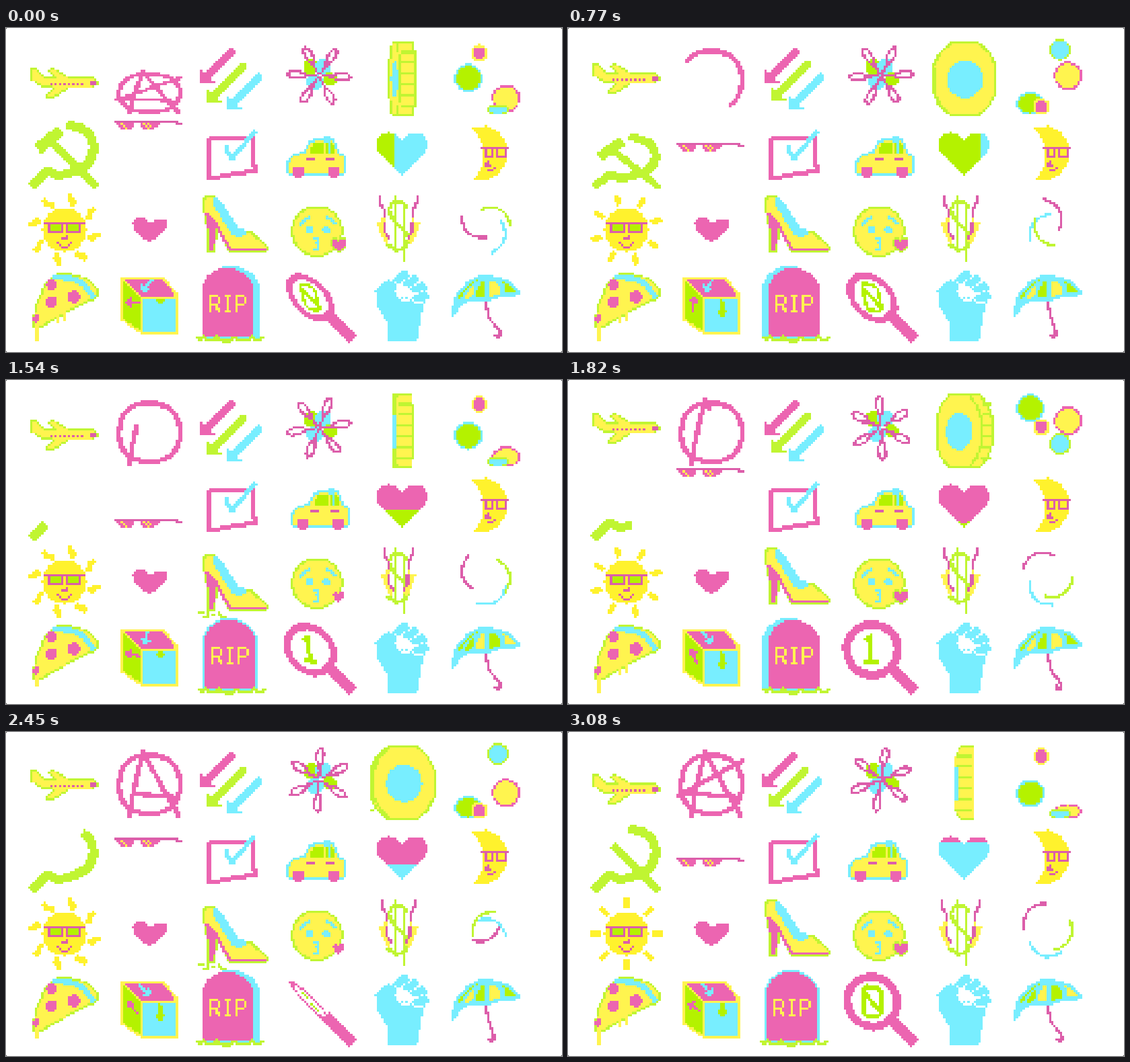
Recreate the animation shown at these times as an HTML page with a canvas. Size 826 by 482 pixels, loop 3.15 s.

```html
<!DOCTYPE html>
<html lang="en">
<head>
<meta charset="utf-8">
<title>Pixel stickers</title>
<style>
  html, body { margin: 0; width: 100%; height: 100%; overflow: hidden; background: #000; }
  canvas { display: block; width: 826px; height: 482px; border-radius: 2px; image-rendering: pixelated; }
</style>
</head>
<body>
<canvas id="stage" width="252" height="147"></canvas>
<script>
const W = 252, H = 147, CELL = 826 / W, BOX = 38, STEP = 70, FRAMES = 45;
const PINK = '#ec65b1', PLUM = '#dc5eaa', CYAN = '#78eeff', LIME = '#c0f532',
      LEAF = '#b4f200', YELLOW = '#fff44f', SUN = '#fff22d', WHITE = '#ffffff';
const { PI, abs, cos, sin, max, min, floor, round } = Math;

const out = document.getElementById('stage').getContext('2d');
const image = out.createImageData(W, H);
const pixels = new Uint32Array(image.data.buffer);
const scratch = document.createElement('canvas');
scratch.width = W; scratch.height = H;
const g = scratch.getContext('2d', { willReadFrequently: true });
g.lineJoin = 'round';
let boxX = 0, boxY = 0;

// Draws one shape and snaps it to whole cells.
function draw(color, render, clip) {
  g.save();
  g.resetTransform();
  g.clearRect(boxX, boxY, BOX, BOX);
  g.restore();
  g.save();
  if (clip) g.clip(new Path2D(clip));
  render();
  g.restore();
  const { data } = g.getImageData(boxX, boxY, BOX, BOX);
  const n = parseInt(color.slice(1), 16);
  const abgr = (0xff000000 | (n & 255) << 16 | n & 0xff00 | n >> 16) >>> 0;
  for (let i = 0; i < BOX * BOX; i++) {
    if (data[i * 4 + 3] > 118) pixels[(boxY + floor(i / BOX)) * W + boxX + i % BOX] = abgr;
  }
}
const fill = (color, d, clip) => draw(color, () => g.fill(new Path2D(d)), clip);
const line = (color, width, d, length, clip) => draw(color, () => {
  g.lineWidth = width;
  g.setLineDash(length === undefined ? [] : [max(length, 0), 9999]);
  g.stroke(new Path2D(d));
}, clip);
function outlined(color, ink, d, width = 6.5) {
  line(ink, width, d);
  fill(color, d);
}
const oval = (x, y, rx, ry = rx) =>
  `M${x - rx} ${y}a${rx} ${ry} 0 1 0 ${2 * rx} 0a${rx} ${ry} 0 1 0 ${-2 * rx} 0z`;
const rect = (x, y, w, h) => `M${x} ${y}h${w}v${h}h${-w}z`;
const snap = v => round(v / CELL) * CELL;
function moved(x, y, paint, sx = 1, sy = sx, turn = 0) {
  g.save();
  g.translate(x, y);
  g.rotate(turn);
  g.scale(sx, sy);
  paint();
  g.restore();
}
const shift = (x, y, paint) => moved(snap(x), snap(y), paint);
const squashed = (ground, scale, paint) => moved(0, ground * (1 - scale), paint, 1, scale);
// One-cell pen; the path counts cells from x, y.
const pen = (color, x, y, d) => moved(snap(x) + CELL / 2, snap(y) + CELL / 2, () => {
  g.lineCap = 'square';
  line(color, 1, d);
}, CELL);
const rad = a => a * PI / 180;
const wave = (f, period, peak = 0) => cos(2 * PI * (f - peak) / period);
const tap = f => f % 15 > 4 && f % 15 < 9;

function plane(f) {
  shift(0, -6.5 - 11 * wave(f, 22.5, 6.7), () => {
    outlined(YELLOW, LIME, 'M39 66L46 66L56 78L78 77L64 67L70 65L92 78H128L135 85L128 90H94L68 106L61 105L76 91L54 88L40 80Z', 5);
    for (let i = 0; i < 8; i++) pen(PLUM, 67 + 2 * CELL * i, 84, 'M0 0v.01');
    fill(PLUM, rect(126, 81, 9, 7));
  });
}

function anarchy(f) {
  const ring = 'M175 52Q188 33 213 34Q258 36 259 78Q256 122 213 122Q168 120 168 78Q168 62 176 50';
  const legs = 'M182 128L188 95L203 30L238 92L258 126', bar = 'M258 98L176 90L164 94L262 42';
  const write = t => {
    line(PINK, 7, ring, 23 * (t - 4));
    line(PINK, 7, legs, 14 * (t - 17.5));
    line(PINK, 7, bar, 35 * (t - 33));
  };
  if (f < 7) squashed(131, max(0.04, 0.65 - 0.105 * f), () => write(FRAMES));
  write(f);
}

function arrows(f) {
  const s = 1.8 * wave(f, 22.5, 6.6);
  [[PINK, 290, 82, 54], [LIME, 300, 110, 61], [CYAN, 327, 121, 55]].forEach(([c, x, y, n]) =>
    shift(x + s, y - s, () => fill(c, `M0 0V-23L7 -15L${n - 7} ${-n}L${n} ${7 - n}L15 -7L23 0Z`)));
}

function atom(f) {
  fill(LEAF, oval(453, 58, 11));
  fill(CYAN, oval(471, 57, 11));
  fill(LEAF, oval(481, 76, 10));
  fill(CYAN, oval(459, 80, 12));
  for (let i = 0; i < 6; i++) {
    moved(465, 71, () => line(PLUM, 3.4, 'M2 0H16L30 -5H42L48 0L42 5H30L16 0'), 1, 1, rad(i * 60 + 3 - 6 * f));
  }
}

const disc = (x, rx, ry) => `M${x - 0.42 * rx} ${76 - ry}h${0.84 * rx}` +
  [[0.38, 0.28], [0.2, 0.35], [0, 0.74], [-0.2, 0.35], [-0.38, 0.28], [-0.84, 0],
   [-0.38, -0.28], [-0.2, -0.35], [0, -0.74], [0.2, -0.35]].map(([x, y]) => `l${x * rx} ${y * ry}`).join('') + 'z';

function coin(f) {
  const spin = rad((98 + 8 * f + 90) % 180 - 90), a = spin - 0.2 * sin(2 * spin);
  const rx = 47 * cos(a), reach = 12 * sin(a), face = 589 + reach, rim = 589 - reach;
  const slab = (c, inset) => {
    for (let t = -1; t <= 1; t += 0.25) fill(c, disc(589 + t * reach, max(rx - inset, 2), 56 - inset));
  };
  slab(LIME, 0);
  slab(YELLOW, 3.3);
  for (let y = 36; y < 120; y += 16) {
    const w = -Math.sign(a) * rx * 0.97;
    line(LIME, 3.6, `M${face + w} ${y}L${rim + w} ${y}`);
  }
  fill(LIME, disc(face, rx, 56));
  fill(YELLOW, disc(face, max(rx - 3.3, 1), 52.7));
  fill(CYAN, oval(face, 76, max(27 * cos(a), 4), 28));
}

function balls(f) {
  const ball = (x, r, inner, outer, peak, air, top, ground) => {
    const late = (f - peak + 33.75) % 22.5 - 11.25;
    const y = ground - (ground - top) * max(0, 1 - (late / air) ** 2);
    const ry = min(r, 129 - y);
    fill(outer, oval(x, y, r, ry));
    fill(inner, oval(x, y, r - 3, ry - 3));
  };
  ball(687, 21, LEAF, CYAN, 4.5, 6.5, 40, 112);
  ball(743, 21, YELLOW, PINK, 6.7, 7.4, 47, 118);
  ball(731, 16, CYAN, LIME, 11.5, 9.5, 32, 121);
  ball(703, 12, PINK, YELLOW, 21.8, 6.5, 36, 117);
}

function sickle(f) {
  const blade = 'M38 236L62 212L78 220L95 215Q133 205 130 175Q127 147 90 144';
  const handle = 'M136 237L66 168';
  if (f < 23) {
    squashed(242, min(1, max(0.03, (22.5 - f) / 14)), () => {
      line(LIME, 13, blade);
      line(LIME, 11, handle);
      line(LIME, 17, 'M47 180L82 152');
    });
  }
  line(LIME, 13, blade, 10 * (f - 19));
  line(LIME, 11, handle, 20 * (f - 38.5));
}

function shades(f) {
  shift(0, 130 + 3.15 * ((f + 2) % 28), () => {
    fill(PLUM, 'M160 0H254V3.3H262V6.6H252V3.3H160Z');
    fill(PINK, 'M164 3H192L186 13H174L166 8ZM198 3H231L219 13H207L200 9Z');
    pen(YELLOW, 169, 4, 'M0 0L2 2M10 0L12 2M12 0L13 1');
  });
}

function checkbox(f) {
  line(PINK, 6.5, 'M303 163H366V188L370 213L340 216L326 220L303 224Z');
  const p = f % 15;
  line(CYAN, 7, 'M328 174V182L336 194L371 152', p < 1 ? 99 : 25 * (p - 2));
}

function car(f) {
  shift(13 * Math.exp(-(((f % 15 - 9.6) / 3) ** 2)), 0, () => {
    outlined(YELLOW, CYAN, 'M421 199L428 190L444 187L452 171L460 168H486L493 188L503 192V213L498 216H421Z');
    fill(CYAN, rect(472, 160, 10, 9));
    fill(LEAF, 'M450 186L457 171H472V186ZM476 171H486L490 186H476Z');
    pen(CYAN, 478, 167, 'M0 0V5');
    pen(PLUM, 446, 193, 'M0 0H3M9 0H12');
    fill(PINK, oval(434, 214, 9) + oval(487, 214, 9));
  });
}

// Three wipes in turn: from the left, from the top, from below.
function heart(f) {
  const d = 'M588 219L554 186Q547 173 553 163Q559 155 569 156Q581 156 588 167Q595 156 607 156Q618 156 623 163Q628 173 622 186Z';
  const p = f % 15, pass = floor(f / 15), tones = [CYAN, LEAF, PINK, CYAN];
  const wipe = [rect(540, 150, 37 + 3.3 * p, 80), rect(540, 150, 100, 12 + 4.5 * p), rect(540, 216 - 3.7 * p, 100, 80)];
  fill(tones[pass], d);
  fill(tones[pass + 1], d, wipe[pass]);
}

function moon() {
  fill(SUN, 'M691 147L716 146Q745 157 745 187Q743 216 716 226L691 227Q712 211 709 187Q708 162 691 147Z');
  pen(PLUM, 704, 176, 'M0 0H12M2 1V4H5V1M7 1V4H11V1M3 6L2 8H4M3 10H5L6 9');
}

function sun(f) {
  const p = f % 15, ray = p < 9 ? 'M37 2L43 4L47 -2L55 -2' : 'M38 0H54';
  const turn = 12 + 5.5 * max(0, p - 8);
  for (let i = 0; i < 8; i++) moved(87, 300, () => line(SUN, 8, ray), 1, 1, rad(turn + i * 45));
  fill(SUN, oval(87, 300, 33));
  fill(LEAF, rect(65, 290, 18, 10) + rect(92, 290, 17, 10));
  pen(PLUM, 55, 287, 'M0 0H18M2 1V4H8V1M10 1V4H16V1M10 6V7H8M6 9L8 11H10L12 9');
}

function smallHeart(f) {
  if (f % 24 > 4 && f % 24 < 9) return;
  fill(PINK, 'M213 320L190 300L188 290L194 282H205L213 291L222 285H238V298Z');
}

function heel(f) {
  const down = tap(f);
  shift(0, down ? 10 : 0, () => {
    const shoe = 'M296 254L309 251L340 302L362 304L386 326V331H333L318 300L296 274Z';
    const shaft = 'M299 280L311 292L309 331H302Z';
    line(LIME, 6, shoe + shaft);
    fill(YELLOW, shoe);
    fill(PINK, shaft);
    fill(CYAN, 'M309 250L318 256L345 297L360 303L350 311L337 309L308 264Z');
    line(PINK, 4, 'M297 276L312 291L325 316L334 330H386');
  });
  if (down) pen(LIME, 285, 345, 'M0 0H2M2 2H3M4 0V2M6 1H7M9 0L10 2M11 2H12');
}

function kiss(f) {
  outlined(YELLOW, LIME, oval(462, 302, 35));
  line(CYAN, 3.8, 'M437 293L447 283L454 281M474 281L482 284L490 293');
  fill(CYAN, oval(451, 300, 6, 5) + oval(476, 300, 6, 5));
  pen(CYAN, 457, 312, 'M0 0H2V2H1M2 3V5H0');
  moved(494, 321, () => {
    const d = 'M0 12L-9 2V-7H-3L0 -3L3 -7H10V2Z';
    if (!tap(f)) line(LIME, 4, d);
    fill(PINK, d);
  }, tap(f) ? 0.8 : 1);
}

function dollar(f) {
  line(LIME, 5, 'M597 268L587 257L575 259L568 270L575 285L591 299L599 313L591 328L579 331L566 321');
  line(LIME, 4.5, 'M579 249V330M592 260V346');
  const sway = 2 - 3 * wave(f, 15);
  [1, -1].forEach(side => shift(side * sway, 0, () => {
    const flame = 'M-21 -18L-25 6L-15 18M-30 -10L-24 8L-17 22', edge = 'M-27 -48V-37L-21 -27V-15M-20 -10V6L-13 16';
    moved(583, 298, () => {
      line(YELLOW, 5, flame);
      line(PLUM, 3.6, edge);
    }, side, 1);
  }));
}

function arcs(f) {
  [[PLUM, 705, 284, 130], [CYAN, 714, 306, 15], [LIME, 721, 295, -60]].forEach(([c, x, y, a]) =>
    moved(x, y, () => line(c, 3.8, 'M14 -26Q42 0 14 26'), 1, 1, rad(a + 18.4 * f)));
}

function pizza(f) {
  const n = tap(f) ? 0 : 9;
  outlined(YELLOW, LIME, 'M71 369L92 367L118 373L133 388V401L118 406L98 416L72 431L46 446L41 444L46 415L59 384Z', 6);
  line(CYAN, 8, 'M70 370L96 372L115 380L131 402');
  fill(PINK, oval(68, 382, 8) + oval(68, 407, 9) + oval(101, 400, 9) + oval(45, 432, 5, 6));
  line(YELLOW, 4, `M46 440V${457 + n}M78 420V${431 + n}M88 416V${426 + n}`);
}

function cube(f) {
  const top = 'M176 373H232L252 398H200Z', left = 'M174 376L199 402V450L174 432Z', front = rect(202, 402, 50, 50);
  const arrow = new Path2D('M-2 -16H2V0H9L0 10L-9 0H-2Z');
  const slide = (color, x, y, turn, face) => {
    const placed = new Path2D();
    placed.addPath(arrow, new DOMMatrix().translate(x, y).rotate(turn));
    fill(color, placed, face);
  };
  fill(YELLOW, 'M171 370H235L255 396V455H200L171 434Z');
  fill(PINK, top);
  fill(LEAF, left);
  fill(CYAN, front);
  slide(LEAF, 229, 420 - 18 * max(0, wave(f, 20)), 0, front);
  slide(PINK, 186, 408, 140 - 50 * wave(f, 20), left);
  slide(CYAN, 208, 385, 45 * wave(f, 10) - 5, top);
}

function tomb(f) {
  const dx = snap(3.2 - 3.6 * wave(f, 15, 2.5));
  const stone = 'M293 459V382L300 369L314 359H342L358 369L367 383V459Z';
  moved(dx, 0, () => {
    moved(7 - 2.1 * dx, 0, () => outlined(CYAN, CYAN, stone));
    fill(PINK, stone);
    pen(YELLOW, 303, 397, 'M0 7V0H3L4 1V3L3 4H0M3 5L4 7M7 0H9M8 0V7M7 7H9M12 7V0H15L16 1V3L15 4H12');
    line(LIME, 4.5, 'M283 460L289 465L294 458L299 464H310L314 459L320 465H333L337 459L344 464H360L365 458L370 464L383 461');
  });
}

function lens(f) {
  const turn = wave(f, 40, 6);
  line(PINK, 16, 'M474 423L515 462');
  line(PINK, 11, 'M425 374L474 424', abs(turn) < 0.25 ? 99 : 0);
  g.save();
  g.translate(452, 401);
  g.rotate(PI / 4);
  g.scale(1, max(abs(turn), 0.02));
  g.rotate(-PI / 4);
  fill(PINK, oval(0, 0, 44));
  fill(WHITE, oval(0, 0, 32));
  if (turn < 0) line(LEAF, 7, 'M-10 -14L-2 -20V19M-12 19H10');
  else line(LEAF, 6, 'M-10 -23H7L13 -17V18L7 23H-8L-14 17V-17ZM-10 -12L10 14');
  g.restore();
}

function fist(f) {
  const open = f % 13 > 2 && f % 13 < 5 ? 3 : 0;
  fill(CYAN, 'M549 390L562 378L573 373L580 384L577 394L592 402L604 398L612 408L622 404L616 432L612 464H566V437L551 414Z');
  [[587, 369], [602, 376], [613, 386], [617, 399]].forEach(([x, y], i) => moved(x + open, y, () => {
    const d = 'M-13 6L2 -9L10 -7L12 1L-3 10Z';
    line(WHITE, 5, d);
    fill(CYAN, d);
  }, 1, 1, 0.12 * i));
  line(WHITE, 4, 'M579 396L590 406L600 402');
}

function umbrella(f) {
  const edge = [[664, 426], [676, 409], [694, 402], [714, 404], [738, 397], [763, 395]];
  const dome = 'M664 426L670 398L686 379L702 371H722L746 377L763 395L738 397L714 404L694 402L676 409Z';
  const flip = floor(f / 4);
  fill(LEAF, dome);
  edge.slice(1).forEach(([x, y], i) => {
    const [px, py] = edge[i], wedge = `M712 372Q${px + 6} ${py - 26} ${px} ${py}L${x} ${y}Q${x + 2} ${y - 22} 712 372Z`;
    fill((i + flip) % 2 ? YELLOW : LEAF, wedge, dome);
    line(CYAN, 3.6, wedge, undefined, dome);
  });
  line(CYAN, 5, dome);
  const x = 727 + 5 * wave(f, 22.5);
  line(PLUM, 4, `M712 406L718 432L${x + 2} 450V459H${x - 4}V454`);
}

const icons = [
  [plane, anarchy, arrows, atom, coin, balls],
  [sickle, shades, checkbox, car, heart, moon],
  [sun, smallHeart, heel, kiss, dollar, arcs],
  [pizza, cube, tomb, lens, fist, umbrella]
];
const rowTop = [5, 40, 73, 106];

function render(f) {
  pixels.fill(0xffffffff);
  icons.forEach((row, r) => row.forEach((icon, c) => {
    boxX = 7 + round(38.3 * c);
    boxY = rowTop[r];
    g.setTransform(1 / CELL, 0, 0, 1 / CELL, 0, 0);
    g.lineCap = 'butt';
    icon(f);
  }));
  out.putImageData(image, 0, 0);
}

const start = performance.now();
let shown = -1;
function tick() {
  const f = floor((performance.now() - start) / STEP) % FRAMES;
  if (f !== shown) render(shown = f);
  requestAnimationFrame(tick);
}
tick();
</script>
</body>
</html>
```
